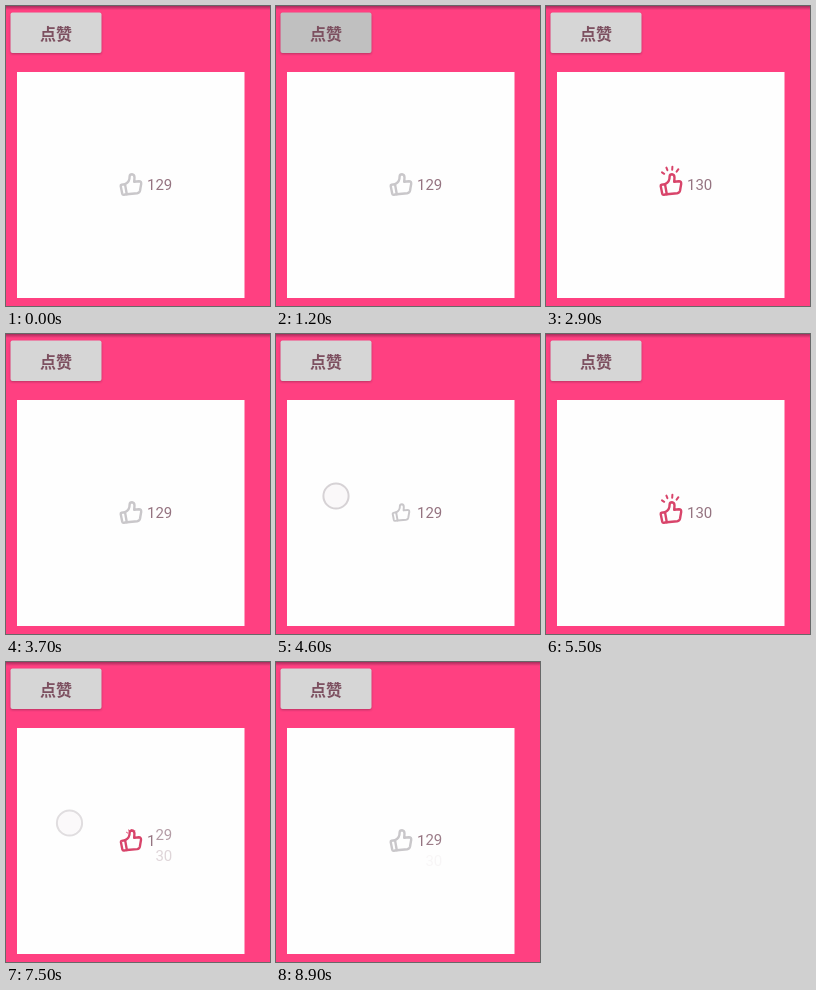
These frames come from a looping animation (264 px wide and 300 px high, 9000 ms). An HTML page:

```html
<!DOCTYPE html>
<html lang="zh-CN">
<head>
<meta charset="utf-8">
<style>
  html, body { margin: 0; width: 100%; height: 100%; overflow: hidden; background: #ff4081; }
  svg { display: block; width: 264px; height: 300px; }
  .label { font: bold 16px "Noto Sans CJK SC", "Noto Sans CJK", sans-serif; fill: #7d5060; text-anchor: middle; }
  .count { font: 15px Roboto, sans-serif; fill: #957481; }
  .icon { fill: none; stroke-width: 2.4; stroke-linecap: round; stroke-linejoin: round; }
</style>
</head>
<body>
<svg viewBox="0 0 264 300">
  <defs>
    <linearGradient id="shade" x2="0" y2="1">
      <stop stop-color="#a82d5c"/>
      <stop offset="1" stop-color="#ff4081"/>
    </linearGradient>
    <filter id="soft" x="-10%" y="-20%" width="120%" height="150%">
      <feGaussianBlur stdDeviation="1"/>
    </filter>
  </defs>
  <rect width="264" height="4" fill="url(#shade)"/>
  <rect x="4.5" y="8" width="91" height="40" rx="2" fill="#8c2a50" opacity=".6" filter="url(#soft)"/>
  <rect id="button" x="4.5" y="6.5" width="91" height="40.5" rx="2"/>
  <text class="label" x="50" y="34">点赞</text>
  <rect x="11" y="66" width="227.5" height="226" fill="#fefefe"/>

  <g id="thumb" class="icon">
    <path d="M-10.3 1Q-10.4 0-9.4-.2L-6-.9-4.2 9.2-7.2 9.7Q-8.5 9.8-8.8 8.6Z"/>
    <path d="M-6-.9Q-1.2-3-1.4-8.5Q-1.2-10.7 1-10.7Q3.4-10.5 3.5-7.5L3.2-3.2 8-3.8Q10.4-3.8 10.2-1.2L9 5.8Q8.5 8 6.2 8.3L-4.2 9.2"/>
    <path id="rays" stroke-width="2" d="M-9-12.6L-6.8-11.2M-4.6-17.4L-3.6-14.8M1.4-18.2L1.2-15.2M7.4-15.8L5.6-13.4"/>
  </g>

  <g class="count">
    <text x="141" y="184.3">1</text>
    <text id="low" x="149.4">29</text>
    <text id="high" x="149.4">30</text>
  </g>
  <circle id="touch" r="12.6" fill="#f5f0f3" fill-opacity=".4" stroke="#d6d2d5" stroke-width="2"/>
</svg>
<script>
const LOOP = 9000;
// Each toggle: time, liked afterwards, touch position (none when the button is used)
const toggles = [
  { at: 1450, liked: 1 },
  { at: 3400, liked: 0, x: 62, y: 162 },
  { at: 4650, liked: 1, x: 60, y: 162 },
  { at: 6450, liked: 0, x: 68, y: 161 },
  { at: 7410, liked: 1, x: 63.5, y: 161 },
  { at: 8690, liked: 0, x: 65, y: 161 }
];
const $ = id => document.getElementById(id);
const ramp = (t, from, to) => Math.min(1, Math.max(0, (t - from) / (to - from)));
const ease = p => (1 - Math.cos(Math.PI * p)) / 2;
const [button, thumb, rays, low, high, touch] =
  ["button", "thumb", "rays", "low", "high", "touch"].map($);

function setDigits(el, y, alpha) {
  el.setAttribute("y", y);
  el.setAttribute("opacity", alpha);
}

function draw(t) {
  const last = toggles.filter(g => g.at <= t).pop() || { at: -LOOP, liked: 0 };
  const age = t - last.at;

  const press = ramp(t, 1080, 1160) * (1 - ramp(t, 1380, 1560));
  const grey = Math.round(214 - 22 * press);
  button.setAttribute("fill", `rgb(${grey},${grey},${grey})`);

  // Digits roll up to 130 or back down to 129
  const roll = ease(ramp(age, 0, 250));
  const v = last.liked ? roll : 1 - roll;
  setDigits(low, 184.3 - 21 * v, 1 - v);
  setDigits(high, 184.3 + 21 * (1 - v), v);

  // The thumb shrinks under a touch and springs back after the toggle
  let shrink = 0, alpha = 0;
  for (const g of toggles) {
    const d = t - g.at;
    if (!g.x || d < -150 || d > 200) continue;
    shrink = ramp(d, -150, -60) * (1 - ramp(d, 0, 100));
    alpha = ramp(d, -150, -90) * (1 - ramp(d, 60, 180));
    touch.setAttribute("cx", g.x);
    touch.setAttribute("cy", g.y);
  }
  touch.setAttribute("opacity", alpha);
  thumb.setAttribute("transform", `translate(125 179) scale(${1 - 0.19 * shrink})`);
  thumb.setAttribute("stroke", last.liked ? "#d8446a" : "#c9c7ca");
  const grow = last.liked ? ramp(age, 0, 180) : 0;
  rays.setAttribute("transform", `translate(0 -5) scale(${grow}) translate(0 5)`);
  rays.setAttribute("opacity", grow ? 1 : 0);
}

const start = performance.now();
function tick() {
  draw((performance.now() - start) % LOOP);
  requestAnimationFrame(tick);
}
tick();
</script>
</body>
</html>
```
